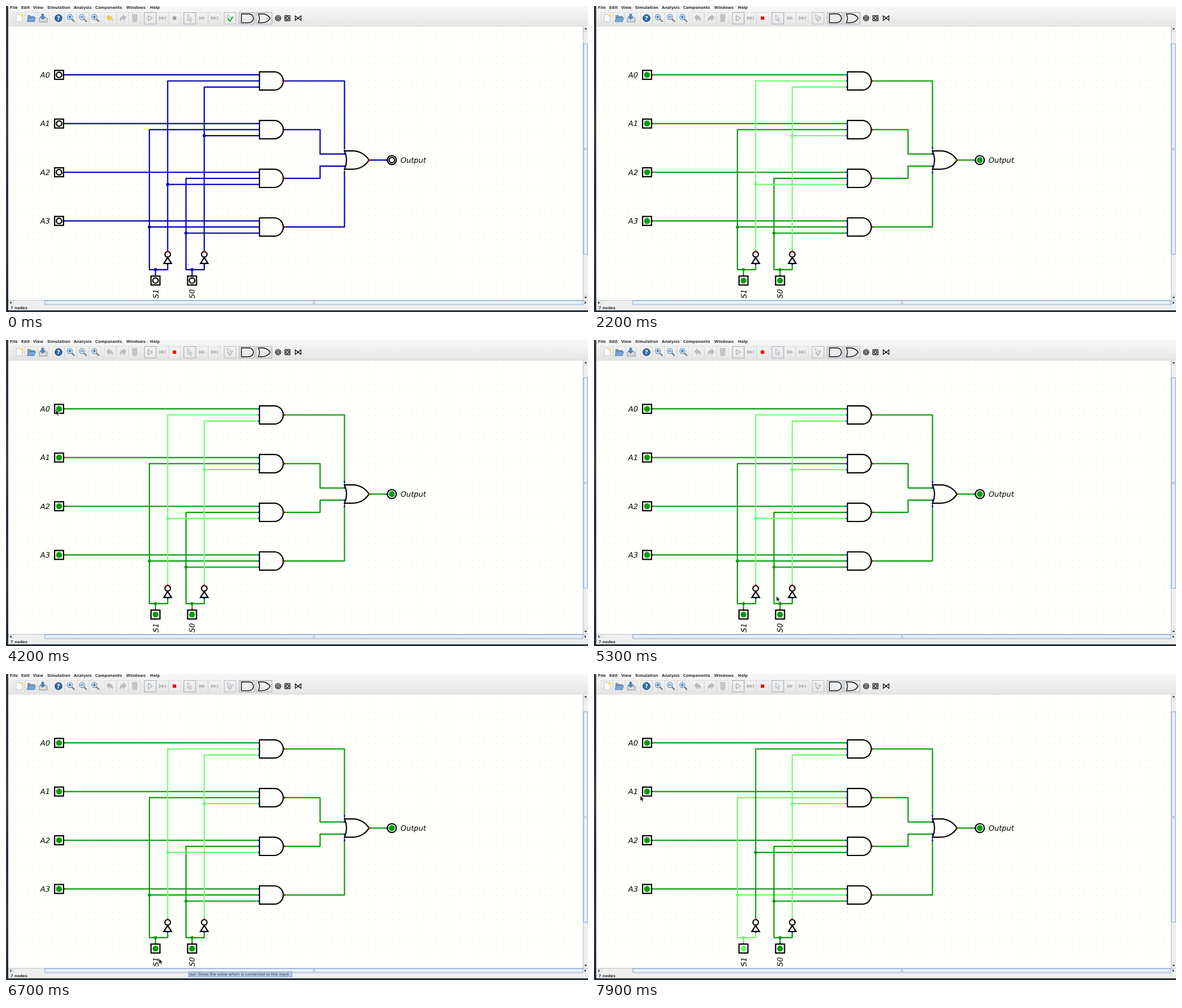
Recreate the animation shown at these times as an HTML page. Size 1031 by 543 pixels, loop 8 s.

```html
<!DOCTYPE html>
<html lang="en">
<head>
<meta charset="utf-8">
<title>Multiplexer simulation</title>
<style>
  html, body { margin: 0; width: 100%; height: 100%; overflow: hidden; background: #fffffc; }
  svg { display: block; width: 1031px; height: 543px; font-family: "DejaVu Sans", sans-serif; text-rendering: geometricPrecision; }
  .ui { font-size: 6.75px; font-weight: bold; fill: #333; }
  .label { font-size: 13px; font-style: italic; }
  .wire { fill: none; stroke: var(--c); stroke-width: 2.2; stroke-linejoin: round; stroke-linecap: round; }
  .dot, .lamp { fill: var(--c); }
  .part { fill: none; stroke: #000; stroke-width: 2.2; }
  .lamp { display: none; }
  .sim .lamp { display: inline; }
  .sim .ring { display: none; }
  .net { --c: #0000ae; }
  .sim .net { --c: #089c0c; }
  .sim .net.on { --c: #6cff6c; }
  .edit { color: var(--hue); }
  .sim .edit { color: #bbb; }
  #stop { fill: #999; }
  .sim #stop { fill: #f00000; }
  #play.hover { fill: #a9c2da; }
</style>
</head>
<body>
<svg id="stage" viewBox="0 0 1031 543"></svg>
<script>
const P = 10.8, gx = n => +(5.6 + n * P).toFixed(1), gy = n => +(46.6 + n * P).toFixed(1);
const rect = (x, y, w, h, fill, extra = '') => `<rect x="${x}" y="${y}" width="${w}" height="${h}" fill="${fill}" ${extra}/>`;
const circle = (x, y, r, extra) => `<circle cx="${x}" cy="${y}" r="${r}" ${extra}/>`;
const path = (d, extra) => `<path d="${d}" ${extra}/>`;
const text = (x, y, s, cls, extra = '') => `<text x="${x}" y="${y}" class="${cls}" ${extra}>${s}</text>`;
const line = (d, c, w = 1.2) => path(d, `fill="none" stroke="${c}" stroke-width="${w}"`);
const pin = (x, y, c) => circle(x, y, 1.5, `fill="${c}"`);
const IN = '#0000b2', OUT = '#b20000';

// Nets: points in grid units (x,y), runs separated by "|", junctions after "*"
const nets = {
  A0: '9,7 41,7', A1: '9,15 41,15', A2: '9,23 41,23', A3: '9,31 41,31',
  S1: '24,40 24,39|26,38 26,39 23,39 23,16 41,16|23,32 41,32*24,39 23,32',
  S0: '30,40 30,39|32,38 32,39 29,39 29,24 41,24|29,33 41,33*30,39 29,33',
  N1: '26,36 26,8 41,8|26,25 41,25*26,25',
  N0: '32,36 32,9 41,9|32,17 41,17*32,17',
  G0: '45,8 55,8 55,19', G1: '45,16 51,16 51,20 55,20',
  G2: '45,24 51,24 51,22 55,22', G3: '45,32 55,32 55,23', Y: '59,21 62,21'
};
const spot = s => { const [x, y] = s.split(','); return [gx(+x), gy(+y)]; };
const netSvg = ([id, def]) => {
  const [runs, dots] = def.split('*');
  const d = runs.split('|').map(r => 'M' + r.split(' ').map(spot).join('L')).join('');
  return `<g class="net" id="${id}">${path(d, 'class="wire"')}${
    dots ? dots.split(' ').map(s => circle(...spot(s), 2.8, 'class="dot"')).join('') : ''}</g>`;
};

const bulb = (x, y, net) => circle(x, y, 4.8, 'class="part ring"') +
  `<g class="net" data-net="${net}">${circle(x, y, 5.3, 'class="lamp"')}</g>`;
const input = (x, y, net) => rect(x - 7.9, y - 7.9, 15.8, 15.8, 'none', 'class="part"') + bulb(x, y, net);
const andGate = n => {
  const y = gy(n);
  return path(`M449 ${y - 16.2}H475a16.2 16.2 0 0 1 0 32.4H449Z`, 'class="part"') +
    [-1, 0, 1].map(k => pin(gx(41), gy(n + k), IN)).join('') + pin(493, y, OUT);
};
const inverter = x => path(`M${x} 446.4l6.7 10.4h-13.4Z`, 'class="part"') +
  circle(x, 440.8, 4.9, 'class="part"') + pin(x, 435, OUT) + pin(x, 458, IN);

function circuit() {
  let s = Object.entries(nets).map(netSvg).join('');
  for (let i = 0; i < 4; i++) {
    const y = gy(7 + 8 * i);
    s += pin(gx(9), y, OUT) + input(94, y, 'A' + i) + andGate(8 + 8 * i) +
      text(78, y + 4.8, 'A' + i, 'label', 'text-anchor="end"');
  }
  for (const [n, id] of [[24, 'S1'], [30, 'S0']]) {
    const x = gx(n);
    s += pin(x, 478.2, OUT) + input(x, 487.2, id) + inverter(gx(n + 2)) +
      text(0, 0, id, 'label', `text-anchor="end" transform="translate(${x + 4.8} 502.5) rotate(-90)"`);
  }
  s += path('M599.6 257.2H614C628 257.2 638 265 643 273.4C638 281.8 628 289.6 614 289.6H599.6Q607 273.4 599.6 257.2Z', 'class="part"') +
    line('M599.6 251.8V257.2M599.6 289.6V295', '#000') +
    [19, 20, 22, 23].map(n => pin(gx(55), gy(n), IN)).join('') + pin(643, 273.4, OUT) +
    pin(675, 273.4, IN) + circle(683.5, 273.4, 7.9, 'class="part"') + bulb(683.5, 273.4, 'Y') +
    text(699, 278.2, 'Output', 'label');
  return s;
}

function toolbar() {
  const button = (x, c, w = 21, id = '') => rect(x - w / 2, 11.5, w, 20.5, 'none', `stroke="${c}" stroke-width=".8" ${id}`);
  const lens = (x, mark) => line(`M${x + 2} 23l5 5`, '#777', 2.4) +
    circle(x - 1.5, 19.5, 4.6, 'fill="#cfe4f7" stroke="#6f8fae" stroke-width="1.2"') + line(mark, '#2868a8', 1.3);
  const tri = (x, c, h = 4.5) => path(`M${x} ${21.5 - h}l${h * 1.6} ${h}l${-h * 1.6} ${h}Z`, `fill="${c}"`);
  const arrow = (x, f, hue) => `<g class="edit" style="--hue:${hue}" transform="translate(${x} 21) scale(${f} 1)">${
    path('M-6 -1l5-5v3q7 0 6 9q-2-4-6-4v4Z', 'fill="currentColor" stroke="#8886" stroke-width=".5"')}</g>`;
  let s = [23, 44.5, 66, 93, 114.5, 136, 158, 184.5, 206.5, 228, 277, 298.5, 347, 369].map(x => button(x, '#d3d8de')).join('');
  s += button(255.5, '#8796a5', 21, 'id="play"') + button(325.5, '#8796a5') + button(397, '#a4afba') +
    button(426.5, '#8796a5', 27) + button(457, '#8796a5', 28);
  s += path('M18 15h8l3 3v10h-11Z', 'fill="#fcfcfc" stroke="#aaa" stroke-width=".7"') + circle(28, 16.5, 2.4, 'fill="#f5df58"');
  s += path('M38 16h5l1 2h7v9h-13Z', 'fill="#7d95ac"') + path('M37 28l2.5-7.5h13l-2 7.5Z', 'fill="#76a5d5" stroke="#41709f" stroke-width=".7"');
  s += path('M59 21h14v7.5h-14Z', 'fill="#d6d9dc" stroke="#777" stroke-width=".8"') + path('M63 14h4v5h3l-5 5l-5-5h3Z', 'fill="#5387ba" stroke="#396386" stroke-width=".5"');
  s += circle(93, 21.5, 6.4, 'fill="#3269a5" stroke="#204a77"') + text(93, 25, '?', '', 'font-size="10" font-weight="bold" fill="#fff" text-anchor="middle"');
  s += lens(114.5, 'M110.5 19.5h5M113 17v5') + lens(136, 'M132 19.5h5') + lens(158, 'M154 19.5h5M156.5 17v5');
  s += arrow(184, 1, '#edd22f') + arrow(207, -1, '#bbb');
  s += path('M223.5 17h9l-1 11h-7ZM223 14.8h10v1.2h-10Z', 'fill="#c5c5c5" stroke="#aaa" stroke-width=".5"');
  s += path('M252 17l7.5 4.5l-7.5 4.5Z', 'fill="#f4f4f4" stroke="#8a8a8a"');
  s += tri(271, '#bbb', 3.7) + tri(276, '#bbb', 3.7) + rect(282, 18, 1.5, 7, '#bbb') + rect(295.5, 18.5, 6, 6, '', 'id="stop"').replace('fill=""', '');
  s += path('M322 15.5v10l2.5-2l2 4l1.5-.8l-2-4h3Z', 'fill="#eee" stroke="#999" stroke-width=".8"');
  s += tri(342, '#bbb', 3.7) + tri(347, '#bbb', 3.7) + tri(363, '#bbb', 3.7) + tri(368, '#bbb', 3.7) + rect(374, 18, 1.5, 7, '#bbb');
  s += path('M391.5 15l8 5l-4 1l-1.5 4Z', 'fill="#eee" stroke="#aaa" stroke-width=".8"') +
    `<g class="edit" style="--hue:#10b421">${line('M393 22l3.5 5l5.5-8', 'currentColor', 2)}</g>`;
  s += line('M417 14H430.5a7.8 7.8 0 0 1 0 15.6H417Z', '#000', 1.3) +
    line('M447 14h7q9 0 14 7.8q-5 7.8-14 7.8h-7q4-7.8 0-15.6Z', '#000', 1.3);
  s += circle(482, 21.5, 4.6, 'class="part" style="stroke-width:1.4"') + circle(482, 21.5, 2.2, 'class="part" style="stroke-width:1.3"');
  s += rect(494.2, 17.2, 8.8, 8.8, 'none', 'stroke="#000" stroke-width="1.3"') + circle(498.6, 21.6, 2.4, 'class="part" style="stroke-width:1.3"');
  return s + line('M512.5 17.5v8l5-4ZM522.5 17.5v8l-5-4Z', '#000', 1.2);
}

function chrome() {
  const menu = { File: 7, Edit: 27, View: 48, Simulation: 73, Analysis: 120, Components: 158, Windows: 213, Help: 255 };
  let s = rect(0, 0, 1031, 36, 'url(#bar)') + line('M4 35.8H1031', '#ccc', .7);
  for (const [name, x] of Object.entries(menu)) s += text(x, 5.3, name, 'ui');
  s += toolbar();
  s += rect(1022.5, 36, 8.5, 486, '#eee') + line('M1022.5 36V522', '#a9b5c1', .8) +
    rect(1022.8, 67, 8.2, 373.5, 'url(#thumbV)', 'stroke="#6382bf" stroke-width=".7"') +
    line('M1024.5 252.5h4M1024.5 254h4M1024.5 255.5h4', '#8098b8', .6) +
    line('M1022.5 44.5h9M1022.5 513h9', '#b9c1c9', .7) +
    path('M1024.2 41.5l2.6-3l2.6 3ZM1024.2 516l2.6 3l2.6-3Z', 'fill="#333"');
  s += rect(4, 522, 1027, 8.5, '#eee') + line('M4 522.3H1031', '#a9b5c1', .8) +
    rect(69, 522.5, 953, 7.8, 'url(#thumbH)', 'stroke="#6382bf" stroke-width=".7"') +
    line('M544 524.5v4M545.5 524.5v4M547 524.5v4', '#8098b8', .6) +
    line('M12.5 522v8', '#b9c1c9', .7) +
    path('M9.5 524l-3 2.5l3 2.5ZM1025 524l3 2.5l-3 2.5Z', 'fill="#333"');
  s += rect(0, 530.5, 1031, 9.5, '#eee') + text(8, 537.8, '7 nodes', 'ui');
  return s + rect(0, 540, 1031, 3, '#26323c') + rect(0, 0, 4, 543, 'url(#desk)');
}

const gradient = (id, dir, ...stops) => `<linearGradient id="${id}" x1="0" y1="0" x2="${1 - dir}" y2="${dir}">${
  stops.map((c, i) => `<stop offset="${i / (stops.length - 1)}" stop-color="${c}"/>`).join('')}</linearGradient>`;
const stage = document.getElementById('stage');
stage.innerHTML = `<defs>${gradient('bar', 1, '#f8f8f8', '#efefef', '#e6e6e6')}${
  gradient('thumbV', 0, '#c8ddf2', '#f4f8fc', '#b8cfe5')}${gradient('thumbH', 1, '#c8ddf2', '#f4f8fc', '#b8cfe5')}${
  gradient('desk', 1, '#3b3438', '#28323f', '#4a4146', '#25303c', '#363b42', '#1f2b35')}
  <pattern id="grid" x="${5.6 - P / 2}" y="${46.6 - P / 2}" width="${P}" height="${P}" patternUnits="userSpaceOnUse">${
    circle(P / 2, P / 2, .55, 'fill="#cfcfcf"')}</pattern></defs>` +
  rect(0, 0, 1031, 543, '#fffffc') + rect(4, 36, 1018, 486, 'url(#grid)') + circuit() + chrome() +
  `<g id="tip">${rect(.4, .4, 183, 9.2, '#b8cfe5', 'stroke="#6382bf" stroke-width=".8"')}${
    text(2, 7.3, 'out: Gives the value which is connected to this input.', '', 'font-size="6.7" fill="#333"')}</g>` +
  path('M0 0V9.2L2.2 7.3L3.8 10.8L5.4 10L3.9 6.7H6.8Z', 'id="mouse" fill="#111" stroke="#fff" stroke-width=".6"');

const $ = id => document.getElementById(id);
const track = [
  [500, 329, 29], [900, 261, 23], [1500, 261, 23], [1600, 300, 190], [1700, 363, 452], [1800, 363, 452],
  [1900, 15, 160], [2200, 15, 160], [2300, 22, 152], [2600, 88, 124], [4500, 88, 124], [4600, 296, 391],
  [4800, 296, 391], [5500, 334, 480], [6400, 334, 480], [6500, 323, 518], [6700, 271, 505], [6800, 271, 505],
  [7000, 266, 486], [7400, 266, 486], [7500, 225, 415], [7700, 80, 188], [7800, 64, 175], [7900, 82, 216]
];
function mouseAt(t) {
  const i = track.findIndex(k => k[0] >= t);
  if (i < 1) return track[Math.max(i, 0)].slice(1);
  const [a, b] = [track[i - 1], track[i]], f = (t - a[0]) / (b[0] - a[0]);
  return [1, 2].map(k => a[k] + (b[k] - a[k]) * f);
}
const show = (el, on) => el.setAttribute('visibility', on ? 'visible' : 'hidden');
const place = (el, x, y) => el.setAttribute('transform', `translate(${x} ${y})`);

function draw() {
  const t = Math.floor(performance.now() % 8000 / 100) * 100; // ten pictures a second
  const a0 = t >= 3200 && t < 4200, s1 = t >= 7200, s0 = false;
  const high = { A0: a0, S1: s1, S0: s0, N1: !s1, N0: !s0 };
  high.G0 = high.Y = a0 && !s1 && !s0;
  stage.classList.toggle('sim', t >= 1300);
  for (const net of stage.querySelectorAll('.net')) net.classList.toggle('on', !!high[net.id || net.dataset.net]);

  const [x, y] = mouseAt(t);
  show($('mouse'), t >= 500 && t !== 2200);
  place($('mouse'), x, y);
  $('play').classList.toggle('hover', t >= 500 && t < 1300 && x < 266);
  show($('tip'), t >= 6400 && t < 6900);
  place($('tip'), ...(t < 6500 ? [334, 490] : [323, 528]));
  requestAnimationFrame(draw);
}
draw();
</script>
</body>
</html>
```
